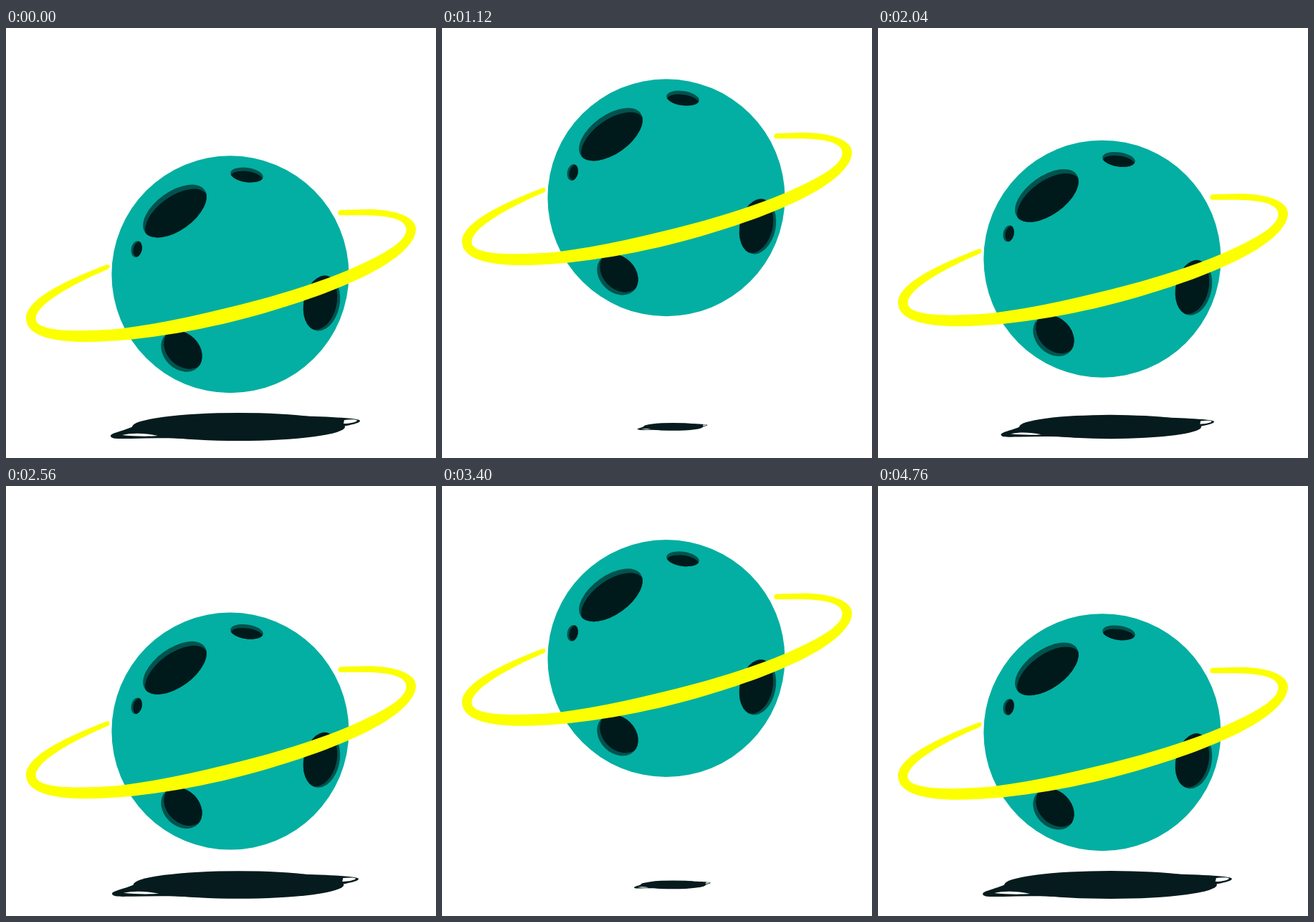
An HTML page with a canvas for the animation above (4800 ms loop, 600 px wide and 600 px high).

```html
<!DOCTYPE html>
<html lang="en">
<head>
<meta charset="utf-8">
<title>Floating planet</title>
<style>
  html, body { margin: 0; width: 100%; height: 100%; overflow: hidden; background: #fff; }
  canvas { display: block; width: 600px; height: 600px; }
</style>
</head>
<body>
<canvas id="stage" width="600" height="600"></canvas>
<script>
const ctx = document.getElementById('stage').getContext('2d');
const LOOP = 4800, STEP = 40;
const RISE = 108.3;
const TURNS = [0, 1230, 2440, 3600, 4800]; // low, high, low, high, low

const TEAL = '#03afa2', RIM = '#00534e', DARK = '#001a1c', SHADE = '#061b1d', YELLOW = '#fbff00';

// Shapes are laid out in the lowest pose.
const ring = new Path2D(`
  M141 329.5 C85 351 28 377.5 28 404.5
  C28 428 62 437.5 112 437.5 C190 437.5 290 418 360 397.5
  C420 380 455 366 478 356 C530 334 572 305 572 280
  C572 262 540 252.5 505 252.5 L467 253.5
  C462 254.5 462 261 467 261
  C500 261 558.5 258 558.5 281
  C558.5 297 530 314.5 478 337 C440 353 395 367.5 350 379.5
  C290 395.5 220 411.5 160 419 C100 424 41.5 424 41.5 405
  C41.5 386 90 358 142 336 C146 334 145 328.5 141 329.5 Z`);

const ringShadow = new Path2D(`
  M186 550 C178 560 146 564 146 569 C146 574 158 573 175 573
  C205 572 235 572 270 574 L300 556 Z
  M400 541 C440 542 494 544 494 548 C494 552 478 554 462 558 L400 560 Z`);

const shadowGaps = new Path2D(`
  M162 568 C176 565 192 565 212 569 C200 570 180 570 162 568 Z
  M472 547 C480 546 490 546 490 548 C488 550 480 552 471 552 Z`);

// x, y, rx, ry, degrees, then the offset of the dark floor
const craters = [
  [235.5, 255, 51, 27, -35.6, 3, 6],
  [336, 204.5, 23, 10, 8, 0, 5],
  [182.2, 308, 7.5, 11.5, 12, 3, 0.5],
  [245, 450.5, 32, 25, 45, 4, -4],
  [440.5, 383.5, 25, 39, 12, -4, -1.5]
];

function ellipse(x, y, rx, ry, degrees = 0) {
  const path = new Path2D();
  path.ellipse(x, y, rx, ry, degrees * Math.PI / 180, 0, 2 * Math.PI);
  return path;
}

function fill(path, color) {
  ctx.fillStyle = color;
  ctx.fill(path);
}

// Equals cubic-bezier(.5, 0, .5, 1)
function ease(x) {
  let low = 0, high = 1;
  for (let i = 0; i < 24; i++) {
    const u = (low + high) / 2;
    if (1.5 * u * (1 - u) + u ** 3 < x) low = u; else high = u;
  }
  return low * low * (3 - 2 * low);
}

function heightAt(t) {
  const i = TURNS.findIndex((turn, k) => t < TURNS[k + 1]);
  const p = ease((t - TURNS[i]) / (TURNS[i + 1] - TURNS[i]));
  return RISE * (i % 2 ? 1 - p : p);
}

function drawShadow(height) {
  const scale = 1 - height * 0.00672;
  ctx.save();
  ctx.translate(322, 556.3);
  ctx.scale(scale, scale);
  ctx.translate(-322, -556.3);
  fill(ringShadow, SHADE);
  fill(ellipse(324.5, 556.5, 148.5, 19.5), SHADE);
  fill(shadowGaps, '#fff');
  ctx.restore();
}

function drawCrater([x, y, rx, ry, degrees, dx, dy]) {
  const edge = ellipse(x, y, rx, ry, degrees);
  fill(edge, RIM);
  ctx.save();
  ctx.clip(edge);
  fill(ellipse(x + dx, y + dy, rx, ry, degrees), DARK);
  ctx.restore();
}

function drawPlanet(height) {
  ctx.save();
  ctx.translate(0, 0.5 - height);
  fill(ellipse(312.9, 343.3, 165.5, 165.5), TEAL);
  craters.forEach(drawCrater);
  fill(ring, YELLOW);
  ctx.restore();
}

function draw(now) {
  const t = Math.floor((now % LOOP) / STEP) * STEP;
  const height = heightAt(t);
  ctx.fillStyle = '#fff';
  ctx.fillRect(0, 0, 600, 600);
  drawShadow(height);
  drawPlanet(height);
}

let start;
function frame(now) {
  start ??= now;
  draw(Math.max(0, now - start));
  requestAnimationFrame(frame);
}
draw(0);
requestAnimationFrame(frame);
</script>
</body>
</html>
```
